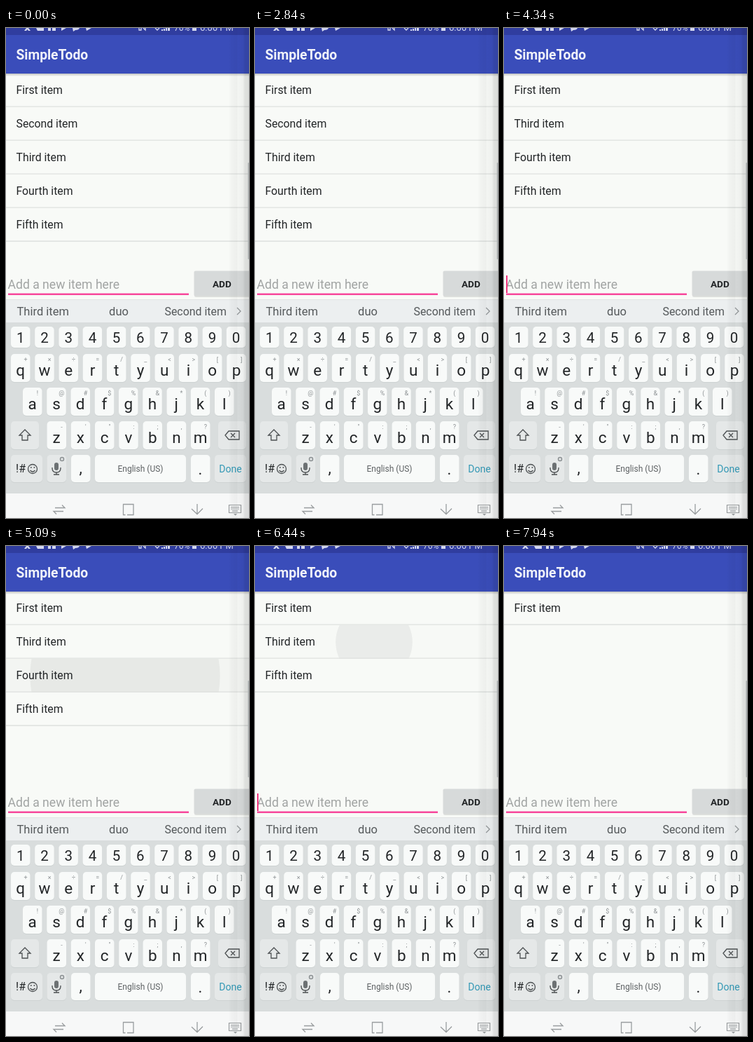
Recreate the animation shown at these times as an HTML page with a canvas. Size 347x699 px, loop 8000 ms.

```html
<!DOCTYPE html>
<html lang="en">
<head>
<meta charset="utf-8">
<style>
  html, body { margin: 0; width: 100%; height: 100%; overflow: hidden; background: #f8faf7; }
  canvas { display: block; }
</style>
</head>
<body>
<canvas id="stage" width="347" height="699"></canvas>
<script>
const ctx = document.getElementById('stage').getContext('2d');
const LOOP = 8000, ROW = 48, LIST_TOP = 65, HOLD = 500, RELEASE = 150;
const INK = '#222527', GREY = '#8d9294';

const ITEMS = ['First item', 'Second item', 'Third item', 'Fourth item', 'Fifth item'];
// Each long press removes the item in the given row.
const REMOVALS = [
  { time: 3890, row: 1 }, { time: 5390, row: 2 },
  { time: 6890, row: 1 }, { time: 7790, row: 1 }
];
// Moments at which the caret toggles, starting hidden.
const CARET = [300, 750, 1350, 1800, 2240, 2840, 3290, 3740, 4340, 4790,
  5390, 5840, 6290, 6740, 7340, 7790];

function rect(x, y, w, h, color, radius = 0) {
  ctx.fillStyle = color;
  ctx.beginPath();
  ctx.roundRect(x, y, w, h, radius);
  ctx.fill();
}

function text(str, x, y, size, color = INK, align = 'left', weight = 400) {
  ctx.font = `${weight} ${size}px Roboto, sans-serif`;
  ctx.textAlign = align;
  ctx.fillStyle = color;
  ctx.fillText(str, x, y);
}

function stroke(path, color, width = 1.3) {
  ctx.strokeStyle = color;
  ctx.lineWidth = width;
  ctx.stroke(new Path2D(path));
}

function fillPath(path, color) {
  ctx.fillStyle = color;
  ctx.fill(new Path2D(path));
}

function drawHeader() {
  rect(0, 0, 347, 10, '#303d9f');
  rect(0, 10, 347, 55, '#3a4dba');
  const shadow = ctx.createLinearGradient(0, 65, 0, 69);
  shadow.addColorStop(0, 'rgba(0,0,0,.22)');
  shadow.addColorStop(1, 'rgba(0,0,0,0)');
  rect(0, 65, 347, 4, shadow);
  text('SimpleTodo', 14.5, 45, 19.3, '#f1f3fa', 'left', 700);

  const pale = '#d4d8f0';
  fillPath('M29 0h3l3 4h-3l-1.5-2l-1.5 2h-3z M43 0h11v4h-9z M60 0h4v4h-4z M66 0h5v4h-5z', pale);
  fillPath('M79 0h7l-7 4z M95 0h10q-1 3-6 3l-3 2z M114 0h8l-7 4z', pale);
  stroke('M190 0v3h3v-3 M196 0l3 3v-3 M213 0l3 3l3-3', pale);
  fillPath('M222 2h2v2h-2z M225 1h2v3h-2z M228 0h2v4h-2z M231 0h3v4h-3z M266 0h6v4h-6z', pale);
  text('76%', 240, 4, 12, pale);
  text('6:06 PM', 277, 4, 13, pale);
}

function drawRipple(t) {
  for (const { time, row } of REMOVALS) {
    const age = t - (time - HOLD);
    if (age < 0 || age >= HOLD + RELEASE) continue;
    const grow = Math.min(1, age / HOLD);
    const fade = Math.min(1, (HOLD + RELEASE - age) / RELEASE);
    const y = LIST_TOP + row * ROW;
    ctx.save();
    ctx.beginPath();
    ctx.rect(0, y, 347, ROW);
    ctx.clip();
    rect(0, y, 347, ROW, `rgba(0,0,0,${0.045 * grow * fade})`);
    ctx.fillStyle = `rgba(0,0,0,${0.05 * fade})`;
    ctx.beginPath();
    ctx.arc(170, y + ROW / 2, 20 + 180 * (1 - (1 - grow) ** 2), 0, 7);
    ctx.fill();
    ctx.restore();
  }
}

function drawList(t) {
  const items = [...ITEMS];
  for (const { time, row } of REMOVALS) if (t >= time) items.splice(row, 1);
  items.forEach((item, i) => {
    const y = LIST_TOP + i * ROW;
    text(item, 14.5, y + 29, 15.8);
    const last = i === items.length - 1;
    rect(0, y + 46.5, 347, 1.3, last ? '#d9dcda' : '#dfe2df');
  });
}

function drawInput(t) {
  text('Add a new item here', 2.5, 372, 17.6, '#a1a4a3');
  rect(3, 378.5, 258, 2.5, '#f7479b');
  if (CARET.filter(c => c <= t).length % 2) rect(3, 353, 2, 25, '#ef347c');
  rect(269, 348, 82, 36, 'rgba(0,0,0,.1)', 2);
  rect(268.5, 346.5, 82, 36, '#d7dada', 2);
  text('ADD', 308.3, 369.5, 13.6, INK, 'center', 700);
}

function key(x, y, w, h, color = '#f8faf9') {
  rect(x, y + 1, w, h, '#cdd2d2', 5);
  rect(x, y, w, h, color, 5);
}

function keyRow(letters, hints, x, y) {
  [...letters].forEach((letter, i) => {
    const left = x + i * 34.25;
    key(left, y, 27.5, 40);
    text(letter, left + 13.7, y + 31, 22.5, INK, 'center');
    text(hints[i], left + 21, y + 11, 9, GREY, 'center');
  });
}

function drawKeyboard() {
  rect(0, 388, 347, 32, '#eceff0');
  rect(0, 387, 347, 1, '#e1e4e4');
  rect(0, 420, 347, 244, '#d9dddd');
  const suggestion = '#55595b';
  text('Third item', 15.5, 410, 16.5, suggestion);
  text('duo', 161, 410, 16.5, suggestion, 'center');
  text('Second item', 226.5, 409.5, 15.9, suggestion);
  stroke('M330 399l5 5l-5 5', '#929799');

  [...'1234567890'].forEach((digit, i) => {
    const x = 7 + i * 34.2;
    key(x, 426, 27.5, 30);
    text(digit, x + 13.8, 449, 20.5, INK, 'center');
  });
  keyRow('qwertyuiop', '+×÷=/_<>[]', 7, 465);
  keyRow('asdfghjkl', '!@#$%&*()', 24, 513);
  keyRow('zxcvbnm', '-\'":;,?', 58.5, 561);

  const special = '#e5e8e8', icon = '#4c5052';
  key(7, 561, 40, 40, special);
  stroke('M27 573l-8 8h4v7h8v-7h4z', icon);
  key(303, 561, 40, 40, special);
  stroke('M313 581l5-6h15v12h-15z M321 578l6 6 M327 578l-6 6', icon);

  key(7, 609, 45, 39, special);
  text('!#', 14, 634, 16);
  stroke('M31.5 629a6.5 6.5 0 1 0 13 0a6.5 6.5 0 1 0-13 0 M34.5 631q3.5 4 7 0', icon);
  rect(35, 626, 1.6, 1.8, icon);
  rect(39.6, 626, 1.6, 1.8, icon);
  key(58.5, 609, 27.5, 39, special);
  rect(69, 620, 6, 11, '#6c7173', 3);
  stroke('M66 627v1q0 6 6 6t6-6v-1 M72 634v3 M68 637h8', icon);
  stroke('M77.5 615a2.5 2.5 0 1 0 5 0a2.5 2.5 0 1 0-5 0', GREY, 1.5);
  key(93, 609, 27.5, 39);
  text(',', 106.7, 635, 22, INK, 'center');
  key(127, 609, 130, 39);
  text('English (US)', 192, 633, 12, '#5d6163', 'center');
  key(264, 609, 27.5, 39);
  text('.', 277.5, 637, 22, INK, 'center');
  key(298, 609, 45, 39, special);
  text('Done', 320.5, 634, 14, '#3298b5', 'center');
}

function drawNavigation() {
  rect(0, 664, 347, 35, '#f7f8f8');
  const line = '#999d9f';
  stroke('M70 684.5h14l-4-4 M82 689.5h-14l4 4', line);
  stroke('M173 694.5h9v-15h-14.5v15h3', line);
  stroke('M273 679v14 M265 686l8 7.5l8-8', line);
  stroke('M318.5 680.5h17v11h-17z', line, 1.2);
  stroke('M321 683.5h12 M321 686h12', line, 1.2);
  stroke('M323 689h8', line, 1.2);
  fillPath('M325 693h5l-2.5 2.5z', line);
}

function drawScreenEdge() {
  const shade = ctx.createLinearGradient(318, 0, 347, 0);
  [[0, 0], [0.12, 0.025], [0.4, 0.045], [0.45, 0.02], [0.7, 0.04], [0.8, 0.1], [1, 0.12]]
    .forEach(([stop, alpha]) => shade.addColorStop(stop, `rgba(0,0,0,${alpha})`));
  rect(318, 0, 29, 699, shade);
  rect(345.5, 192, 1.5, 138, '#abb0b0', 1);
}

function draw() {
  const t = performance.now() % LOOP;
  rect(0, 0, 347, 699, '#f8faf7');
  drawRipple(t);
  drawHeader();
  drawList(t);
  drawInput(t);
  drawKeyboard();
  drawNavigation();
  drawScreenEdge();
  requestAnimationFrame(draw);
}
draw();
</script>
</body>
</html>
```
